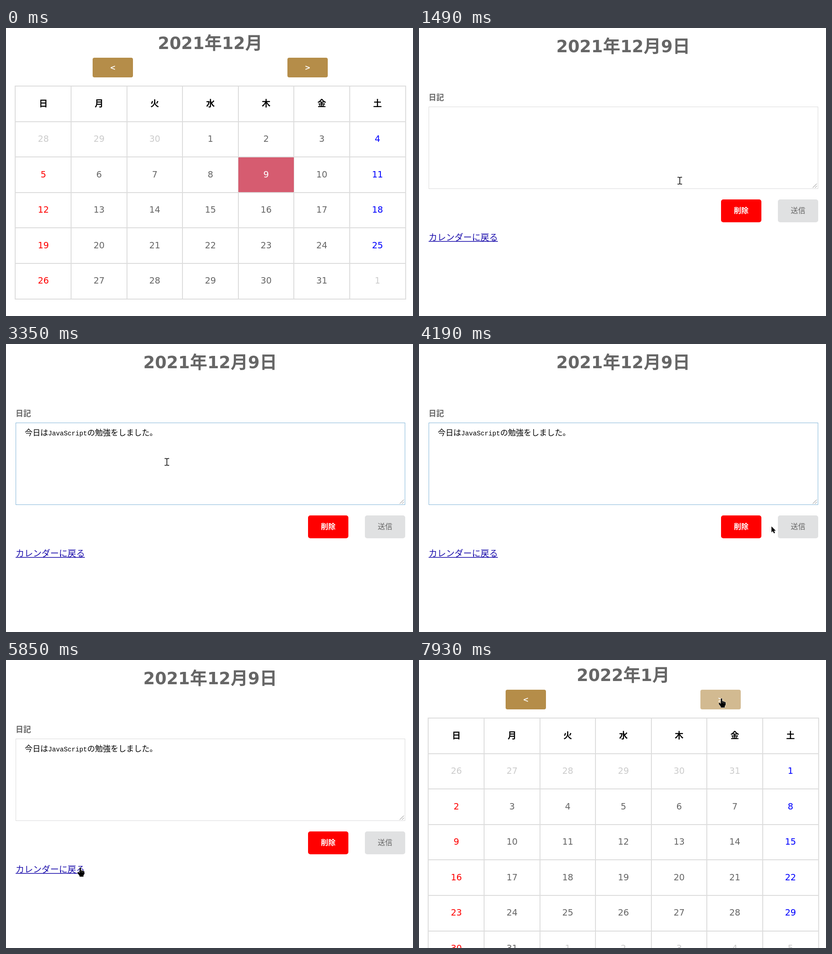
Write an HTML page that moves like this. It is 888 px wide and 630 px high and loops after 8 s.

```html
<!DOCTYPE html>
<html lang="ja">
<head>
<meta charset="utf-8">
<style>
html, body { margin: 0; width: 100%; height: 100%; overflow: hidden; background: #fff; }
svg { display: block; }
text { font-family: "Noto Sans CJK JP", "Noto Sans CJK", sans-serif; }
.latin { font-family: "DejaVu Sans", sans-serif; }
.mono { font-family: "Liberation Mono", monospace; }
</style>
</head>
<body>
<svg id="stage" width="888" height="630" viewBox="0 0 888 630"></svg>
<script>
const stage = document.getElementById('stage');
const LOOP = 8000;

// Moments of the story, in ms
const T = {
  enter: 30, openDiary: 1440, focus: 2430, paste: 2860, blur: 4700,
  submit: 4930, reloaded: 4990, back: 6300, leaveRest: 6800, nextMonth: 7640
};
const CARET_PERIOD = 530;

// Pointer path: time, x, y
const PATH = [
  [30, 566, 572], [450, 568, 392], [680, 568, 392], [1000, 569, 334], [1490, 569, 334],
  [2090, 351, 258], [3350, 351, 258], [4150, 768, 398], [4190, 769, 399], [4450, 822, 400],
  [5310, 822, 400], [5560, 520, 498], [5790, 147, 458], [5850, 162, 454], [5950, 162, 454],
  [6110, 152, 454], [6800, 152, 454], [6970, 644, 82], [7000, 648, 81], [7510, 660, 84],
  [8000, 660, 84]
];

const COLUMNS = [19, 141, 263, 384, 506, 627, 749, 871];
const ROWS = [126, 204, 281, 359, 436, 514, 592, 669];
const PREV = [189, 65, 88, 43], NEXT = [614, 65, 88, 43];
const AREA = [21, 172, 850, 180];
const DELETE = [659, 375, 88, 50], SEND = [783, 375, 88, 50];
const LINK = [21, 445, 151, 24];

const inside = (p, [x, y, w, h]) => p && p.x >= x && p.x < x + w && p.y >= y && p.y < y + h;

const rect = ([x, y, w, h], fill, radius = 0) =>
  `<rect x="${x}" y="${y}" width="${w}" height="${h}" rx="${radius}" fill="${fill}"/>`;

// Japanese and Latin runs are set in their own font and size
function label(content, x, y, { size, latin = size, font = 'latin', weight = 400, fill = '#666', anchor = 'middle' }) {
  const runs = content.match(/[!-~]+|[^!-~]+/g).map(run => {
    const safe = run.replace('<', '&lt;');
    return /[!-~]/.test(run) ? `<tspan class="${font}" font-size="${latin}">${safe}</tspan>` : safe;
  });
  return `<text x="${x}" y="${y}" font-size="${size}" font-weight="${weight}" fill="${fill}" text-anchor="${anchor}">${runs.join('')}</text>`;
}

const title = (content, y) => label(content, 445.5, y, { size: 38, latin: 36.5, weight: 700 });

function pointerAt(t) {
  if (t < T.enter) return null;
  const i = PATH.findIndex(k => k[0] > t);
  const [t0, x0, y0] = PATH[i - 1], [t1, x1, y1] = PATH[i];
  const u = (t - t0) / (t1 - t0), e = u * u * (3 - 2 * u);
  return { x: x0 + (x1 - x0) * e, y: y0 + (y1 - y0) * e };
}

function arrowButton(box, sign, pointer) {
  const opacity = inside(pointer, box) ? 0.6 : 1;
  return `<g opacity="${opacity}">${rect(box, '#b58d49', 4)}${
    label(sign, box[0] + 44, 92, { size: 15, weight: 700, fill: '#fff' })}</g>`;
}

function calendar(year, month, pointer, canHover) {
  const first = new Date(year, month - 1, 1).getDay();
  const weeks = Math.ceil((first + new Date(year, month, 0).getDate()) / 7);
  const bottom = ROWS[weeks + 1] + 2;
  let out = title(`${year}年${month}月`, 46) +
    arrowButton(PREV, '<', pointer) + arrowButton(NEXT, '>', pointer);

  for (const x of COLUMNS) out += rect([x, 126, 2, bottom - 126], '#ddd');
  for (const y of ROWS.slice(0, weeks + 2)) out += rect([19, y, 854, 2], '#ddd');
  [...'日月火水木金土'].forEach((day, i) => {
    out += label(day, 81.5 + 121.5 * i, 172, { size: 19, weight: 700, fill: '#000' });
  });

  for (let i = 0; i < weeks * 7; i++) {
    const column = i % 7, row = Math.floor(i / 7) + 1;
    const date = new Date(year, month - 1, 1 - first + i);
    const x = COLUMNS[column] + 1, y = ROWS[row] + 2;
    const box = [x, y, COLUMNS[column + 1] + 1 - x, ROWS[row + 1] - y];
    const today = year === 2021 && month === 12 && date.getMonth() === 11 && date.getDate() === 9;
    const hovered = canHover && inside(pointer, box);
    if (hovered || today) out += rect(box, hovered ? '#d3d3d3' : '#d65c70');
    const fill = today ? '#fff' : date.getMonth() !== month - 1 ? '#ccc'
      : column === 0 ? '#f00' : column === 6 ? '#00f' : '#666';
    out += label(`${date.getDate()}`, 81.5 + 121.5 * column, 171.5 + 77.5 * row, { size: 19, fill });
  }
  return out;
}

function diary(t, pointer) {
  const focused = t >= T.focus && t < T.blur;
  const blend = focused ? Math.min(1, (t - T.focus) / 100) : 0;
  const mix = (from, to) => Math.round(from + (to - from) * blend);
  const border = `rgb(${mix(218, 133)},${mix(218, 183)},${mix(219, 217)})`;
  const written = t >= T.paste;
  const caretOn = focused && Math.floor((t - T.focus) / CARET_PERIOD) % 2 === 0;

  let out = title('2021年12月9日', 53) +
    label('日記', 21, 157.5, { size: 16.7, weight: 700, anchor: 'start' }) +
    `<rect x="21.5" y="172.5" width="849" height="179" fill="#fff" stroke="${border}"/>` +
    '<path d="M859 349.5 868 340.5M864 349.5 868 345.5" stroke="#777" fill="none"/>';
  if (written) {
    out += label('今日はJavaScriptの勉強をしました。', 41, 199.5,
      { size: 17, latin: 14.2, font: 'mono', weight: 300, fill: '#000', anchor: 'start' });
  }
  if (caretOn) out += rect([written ? 329.5 : 41, 186, 1, 15], '#000');
  return out +
    rect(DELETE, '#f00', 5) + label('削除', 703, 405, { size: 16, weight: 700, fill: '#fff' }) +
    rect(SEND, inside(pointer, SEND) ? '#cacbcd' : '#e0e1e2', 5) + label('送信', 827, 405, { size: 16 }) +
    label('カレンダーに戻る', 21, 464.5, { size: 18.9, weight: 300, fill: '#1a0dab', anchor: 'start' }) +
    rect([21, 466, 151, 1.5], '#1a0dab');
}

const CURSORS = {
  arrow: '<path d="M0 0V13L3 10.3 5.4 15.2 7.7 14.1 5.4 9.4H9.5Z" stroke="#fff" stroke-width="1" paint-order="stroke"/>',
  ibeam: '<path d="M-5 -7.5H-1.5L0 -6.5 1.5 -7.5H5M-5 7.5H-1.5L0 6.5 1.5 7.5H5M0 -6.5V6.5" fill="none" stroke="#000" stroke-width="1.5"/>',
  hand: '<path d="M-1.5 1Q0 -1 1.5 1V6L4 6.5 6.5 7.5 9 8.5V14L7 17V20H-1.5V18L-6 12Q-6 9 -3.5 10L-1.5 12Z" stroke="#fff" stroke-width="1" paint-order="stroke"/>' +
    '<path d="M1.7 7V10M4.2 8V11M6.7 9V11" stroke="#aaa" stroke-width=".6"/>'
};

function cursor(pointer, page) {
  if (!pointer) return '';
  const onAny = boxes => boxes.some(box => inside(pointer, box));
  const kind = page === 'diary'
    ? (inside(pointer, AREA) ? 'ibeam' : onAny([DELETE, SEND, LINK]) ? 'hand' : 'arrow')
    : page === 'calendar' && onAny([PREV, NEXT]) ? 'hand' : 'arrow';
  return `<g transform="translate(${Math.round(pointer.x)} ${Math.round(pointer.y)})">${CURSORS[kind]}</g>`;
}

function render(t) {
  const pointer = pointerAt(t);
  const page = t < T.openDiary || t >= T.back ? 'calendar'
    : t >= T.submit && t < T.reloaded ? 'blank' : 'diary';
  let body = '';
  if (page === 'calendar') {
    const canHover = t < T.openDiary || t > T.leaveRest + 60;
    body = t < T.nextMonth ? calendar(2021, 12, pointer, canHover) : calendar(2022, 1, pointer, canHover);
  } else if (page === 'diary') {
    body = diary(t, pointer);
  }
  return body + cursor(pointer, page);
}

const start = performance.now();
let shown = '';
function tick() {
  const markup = render((performance.now() - start) % LOOP);
  if (markup !== shown) stage.innerHTML = shown = markup;
  requestAnimationFrame(tick);
}
tick();
</script>
</body>
</html>
```
